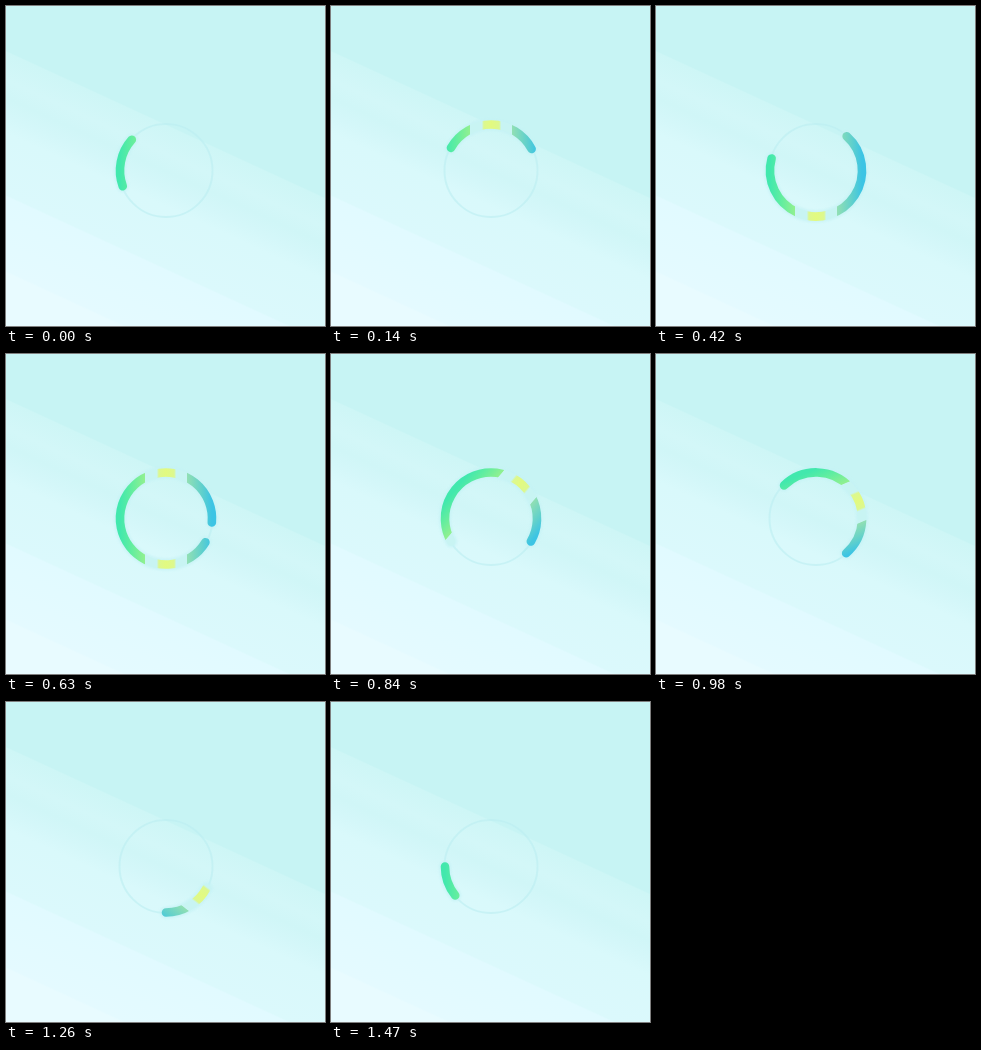
An HTML page that plays this animation: 319x320 px, repeating every 1540 ms.

```html
<!DOCTYPE html>
<html lang="en">
<head>
<meta charset="utf-8">
<title>Loading ring</title>
<style>
  html, body { margin: 0; width: 100%; height: 100%; overflow: hidden; background: #daf9fb; }
  svg { display: block; width: 100vw; height: 100vh; }
  path, circle { fill: none; stroke-linecap: round; }
</style>
</head>
<body>
<svg viewBox="0 0 319 320" preserveAspectRatio="none">
  <defs>
    <linearGradient id="sky" gradientUnits="userSpaceOnUse" x1="0" y1="0" x2="-134" y2="291">
      <stop offset=".126" stop-color="#c7f4f4"/>
      <stop offset=".13" stop-color="#cef6f6"/>
      <stop offset=".21" stop-color="#d3f7f8"/>
      <stop offset=".26" stop-color="#d0f6f7"/>
      <stop offset=".31" stop-color="#d4f7f9"/>
      <stop offset=".36" stop-color="#d9f9fb"/>
      <stop offset=".535" stop-color="#dbf9fc"/>
      <stop offset=".54" stop-color="#e1faff"/>
      <stop offset=".75" stop-color="#e4faff"/>
      <stop offset=".756" stop-color="#e8fbff"/>
    </linearGradient>
    <linearGradient id="hue" gradientUnits="userSpaceOnUse" x1="-51" x2="51" y1="0" y2="0">
      <stop offset=".05" stop-color="#42e8ad"/>
      <stop offset=".157" stop-color="#60eda0"/>
      <stop offset=".29" stop-color="#90f090"/>
      <stop offset=".298" stop-color="#c8f4f3"/>
      <stop offset=".41" stop-color="#c8f4f3"/>
      <stop offset=".43" stop-color="#dcf88f"/>
      <stop offset=".5" stop-color="#e2fa80"/>
      <stop offset=".58" stop-color="#dcf88f"/>
      <stop offset=".6" stop-color="#c8f4f3"/>
      <stop offset=".702" stop-color="#c8f4f3"/>
      <stop offset=".71" stop-color="#90dfb4"/>
      <stop offset=".853" stop-color="#60d0cc"/>
      <stop offset=".95" stop-color="#3cc4e4"/>
    </linearGradient>
    <filter id="soft" filterUnits="userSpaceOnUse" x="-65" y="-65" width="130" height="130">
      <feGaussianBlur stdDeviation="1"/>
    </filter>
  </defs>
  <rect width="319" height="320" fill="url(#sky)"/>
  <circle cx="160" cy="164.5" r="46.5" stroke="#bdeff2" stroke-width="2" opacity=".6"/>
  <g id="spin">
    <path id="halo" stroke="#c4f2f5" stroke-width="12" opacity=".7" filter="url(#soft)"/>
    <path id="arc" stroke="url(#hue)" stroke-width="8.6"/>
  </g>
</svg>
<script>
  const STEP = 70, STEPS = 22, R = 46;

  // [step, degrees clockwise from the top]
  const tail = [[0, 250], [4, 349], [9, 481], [12, 600], [14, 676], [18, 838], [20, 928], [21, 951], [22, 970]];
  const head = [[0, 312], [4, 532], [9, 815], [12, 840], [14, 859], [18, 900], [20, 938], [21, 990], [22, 1032]];
  const turn = [[0, 0], [9, 0], [12, 40], [14, 67], [18, 128], [19, 148], [20, 0], [22, 0]];

  const [spin, halo, arc] = ['spin', 'halo', 'arc'].map(id => document.getElementById(id));

  function at(keys, n) {
    const i = keys.findIndex(k => k[0] > n);
    const [n0, v0] = keys[i - 1], [n1, v1] = keys[i];
    return v0 + (v1 - v0) * (n - n0) / (n1 - n0);
  }

  function point(deg) {
    const a = deg * Math.PI / 180;
    return `${(R * Math.sin(a)).toFixed(2)} ${(-R * Math.cos(a)).toFixed(2)}`;
  }

  function draw(now) {
    const n = Math.floor(now / STEP) % STEPS;
    const rot = at(turn, n), a = at(tail, n), b = at(head, n);
    const d = `M${point(a - rot)}A${R} ${R} 0 ${b - a > 180 ? 1 : 0} 1 ${point(b - rot)}`;
    spin.setAttribute('transform', `translate(160 164.5) rotate(${rot})`);
    halo.setAttribute('d', d);
    arc.setAttribute('d', d);
  }

  function tick() {
    draw(performance.now());
    requestAnimationFrame(tick);
  }
  tick();
</script>
</body>
</html>
```
